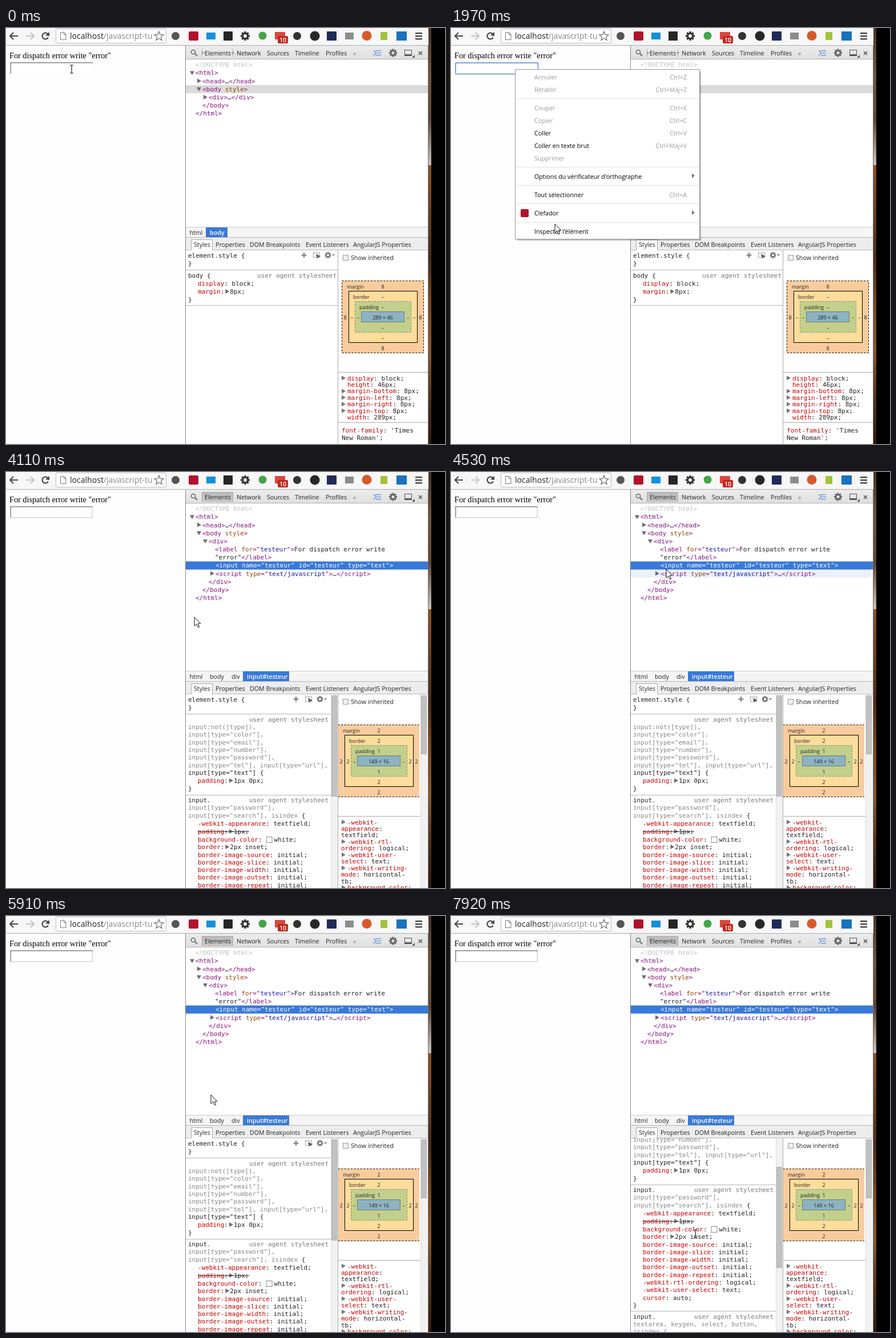
Animation of 769 by 728 pixels, one loop 8 s. Source, as an HTML page with a canvas:

```html
<!DOCTYPE html>
<html lang="fr">
<head>
<meta charset="utf-8">
<title>Inspecter l'élément</title>
<style>
html, body { margin: 0; width: 100%; height: 100%; overflow: hidden; background: #000 }
canvas { display: block }
</style>
</head>
<body>
<canvas id="stage" width="769" height="728"></canvas>
<script>
const g = document.getElementById('stage').getContext('2d');
const SANS = '10.7px "Open Sans", sans-serif', BOLD = '600 ' + SANS;
const SMALL = '9px "Open Sans", sans-serif';
const MONO = '11px "DejaVu Sans Mono", monospace';
const INK = { p: '#881280', o: '#994500', b: '#1a1aa6', k: '#222', r: '#c80000', g: '#888', w: '#fff' };

// pointer: time, x, y; held until the next entry
const MOVES = [
  [0, 115, 72], [960, 114, 73], [1660, 126, 138], [1810, 160, 262], [1970, 182, 343],
  [2120, 179, 350], [2270, 177, 352], [3690, 192, 340], [3810, 232, 312], [3960, 284, 280],
  [4110, 330, 254], [4230, 362, 232], [4380, 376, 184], [4530, 377, 170], [4680, 376, 164],
  [4800, 376, 161], [5640, 372, 186], [5790, 364, 256], [5910, 359, 313], [6030, 370, 352],
  [6180, 398, 420], [6300, 430, 488], [6450, 464, 545], [6590, 481, 565], [7350, 474, 569],
  [7500, 456, 565], [7620, 438, 558], [7770, 425, 553], [7920, 428, 556]
];

function box(x, y, w, h, c) { g.fillStyle = c; g.fillRect(x, y, w, h); }
function frame(x, y, w, h, c, dash = []) {
  g.strokeStyle = c; g.lineWidth = 1; g.setLineDash(dash);
  g.strokeRect(x + .5, y + .5, w - 1, h - 1); g.setLineDash([]);
}
function round(x, y, w, h, r, c, edge) {
  g.beginPath(); g.roundRect(x, y, w, h, r); g.fillStyle = c; g.fill();
  if (edge) { g.strokeStyle = edge; g.lineWidth = 1; g.stroke(); }
}
function disc(x, y, r, c) { g.beginPath(); g.arc(x, y, r, 0, 7); g.fillStyle = c; g.fill(); }
function line(c, w, ...p) {
  g.beginPath(); g.strokeStyle = c; g.lineWidth = w;
  for (let i = 0; i < p.length; i += 2) g.lineTo(p[i], p[i + 1]);
  g.stroke();
}
function poly(c, ...p) {
  g.beginPath(); g.fillStyle = c;
  for (let i = 0; i < p.length; i += 2) g.lineTo(p[i], p[i + 1]);
  g.fill();
}
function fade(x, y, w, h, ...cs) {
  const f = g.createLinearGradient(0, y, 0, y + h);
  cs.forEach((c, i) => f.addColorStop(i / (cs.length - 1), c));
  box(x, y, w, h, f);
}
function text(s, x, y, c = '#222', font = SANS, align = 'left') {
  g.font = font; g.fillStyle = c; g.textAlign = align; g.fillText(s, x, Math.round(y + 4));
}
// each part starts with its colour key; returns the end x
function rich(x, y, ...parts) {
  for (const p of parts) {
    text(p.slice(1), x, y, INK[p[0]], MONO);
    x += g.measureText(p.slice(1)).width;
  }
  return x;
}
const right = (x, y, c = '#6e6e6e') => poly(c, x - 3, y - 4, x + 4, y, x - 3, y + 4);
const down = (x, y, c = '#6e6e6e') => poly(c, x - 4, y - 3, x + 4, y - 3, x, y + 4);
function gear(x, y, r, c, hole) {
  for (let i = 0; i < 4; i++) {
    const a = i * Math.PI / 4, u = Math.cos(a) * r, v = Math.sin(a) * r;
    line(c, r / 2.3, x - u, y - v, x + u, y + v);
  }
  disc(x, y, r * .74, c); disc(x, y, r * .36, hole);
}

function browserBar() {
  const bg = '#f7f7f7', c = '#444';
  box(0, 0, 740, 30, bg);
  for (const [x, d, k] of [[14, -1, c], [42, 1, '#c4c4c4']]) {
    line(k, 2, x - 7 * d, 14, x + 6 * d, 14);
    line(k, 2, x + d, 8, x + 7 * d, 14, x + d, 20);
  }
  g.beginPath(); g.arc(69, 14, 5.5, .5, 5.5); g.strokeStyle = c; g.lineWidth = 2.2; g.stroke();
  poly(c, 76, 7, 76, 14, 69, 13);
  round(87.5, 1.5, 193, 25, 2, '#fff', '#b8b8b8');
  g.lineWidth = 1; g.strokeStyle = '#777';
  g.stroke(new Path2D('M95.500 7.500h6l3.500 3.500v9.500h-9.500zM101.500 7.500v4h4'));
  g.save(); g.beginPath(); g.rect(108, 3, 148, 22); g.clip();
  const url = '14.05px "Open Sans", sans-serif';
  text('localhost', 112, 14.5, '#222', url);
  text('/javascript-tutorial', 112 + g.measureText('localhost').width, 14.5, '#888', url);
  g.restore();
  g.beginPath();
  for (let i = 0; i < 10; i++) {
    const a = i * Math.PI / 5 - Math.PI / 2, r = i % 2 ? 3.6 : 8.5;
    g.lineTo(268 + r * Math.cos(a), 14.5 + r * Math.sin(a));
  }
  g.closePath(); g.strokeStyle = '#666'; g.lineWidth = 1.2; g.stroke();

  disc(297, 14, 7, '#555');
  round(320, 6, 17, 16, 2, '#b3122c');
  box(351, 8, 16, 12, '#1390dc');
  box(381, 6, 16, 16, '#262626');
  gear(419, 14, 8, '#333', bg);
  disc(449.5, 13.5, 7, '#43a547');
  box(471, 7, 18, 13, '#d8493d');
  round(476, 14, 18, 13, 2, '#c0271f');
  text('10', 485, 20.5, '#fff', BOLD, 'center');
  disc(510, 14, 7, '#333');
  disc(541, 14, 8.5, '#272727');
  box(562, 6, 17, 16, '#1f2b58');
  box(594, 8, 15, 12, '#8c8c8c');
  disc(632, 13.5, 8.5, '#d9582b');
  box(656, 7, 12, 14, '#a0c33a');
  box(684, 6, 18, 16, '#1773bd');
  for (const y of [8, 13, 18]) box(717, y, 12, 2.4, '#444');
  box(0, 30, 740, 1, '#aaa');
}

function page(t) {
  box(0, 31, 314, 697, '#fdfdfd');
  text('For dispatch error write "error"', 6, 49, '#000', '14.26px "Liberation Serif", serif');
  box(8, 61, 144, 19, '#fff');
  if (t >= 1080 && t < 3420) {
    round(8, 61, 144.5, 19.5, 1, '#fff');
    g.strokeStyle = '#7ba5e6'; g.lineWidth = 2; g.stroke();
    if (t < 1510 || t >= 2120 && t < 2580 || t >= 3140) box(9, 63, 1, 15, '#000');
  } else {
    if (t >= 3420) { box(7, 79, 145, 1.5, '#d4d4d4'); box(150.5, 60, 1.5, 20, '#d4d4d4'); }
    box(7, 60, 145, 1.5, '#858585'); box(7.5, 60, 1.5, 20, '#858585');
  }
}

function highlight(x, y, w, h, tag, id, W, H) {
  box(x, y, w, h, 'rgba(111,168,220,.66)');
  const ty = y + h + 3.5, n = (tag + id + W + H).length + 7;
  g.beginPath();
  [[x + .5, ty], [x + 13, ty], [x + 21, ty - 6], [x + 29, ty], [x + n * 6.62 + 7, ty],
   [x + n * 6.62 + 7, ty + 17], [x + .5, ty + 17]].forEach(p => g.lineTo(...p));
  g.closePath(); g.fillStyle = '#ffffc2'; g.fill();
  g.strokeStyle = '#888'; g.lineWidth = 1; g.stroke();
  rich(x + 4, ty + 8.5, 'p' + tag, 'b' + id, 'k ' + W, 'gpx × ', 'k' + H, 'gpx');
}

function toolbar(picked) {
  fade(315, 31, 424, 23, '#ececec', '#e0e0e0'); box(315, 54, 424, 1, '#b0b0b0');
  g.strokeStyle = '#666'; g.lineWidth = 1.5;
  g.beginPath(); g.arc(328, 42, 3.6, 0, 7); g.stroke(); line('#666', 2, 331, 45, 335, 49);
  if (picked) { fade(343, 35, 55, 17, '#b9b9b9', '#cbcbcb'); frame(343, 35, 55, 17, '#aaa'); }
  else for (const x of [343, 397]) {
    fade(x, 35, 1, 17, '#e4e4e4', '#777', '#e4e4e4'); box(x - 2 + (x < 350) * 2, 43, 5, 1, '#777');
  }
  const tabs = { Elements: 348, Network: 404, Sources: 457, Timeline: 506, Profiles: 560, '»': 608 };
  for (const s in tabs) text(s, tabs[s], 43.5, s == '»' ? '#777' : '#222');
  line('#5a8fe0', 1.4, 644, 39, 649, 43.5, 644, 48);
  for (const y of [39, 43, 47]) box(y == 43 ? 651 : 648, y, y == 43 ? 6 : 9, 1.3, '#5a8fe0');
  gear(678, 43.5, 7, '#666', '#e5e5e5');
  frame(698, 38, 13, 11, '#555'); box(698, 46, 13, 3, '#555'); poly('#555', 716, 47, 716, 52, 711, 52);
  line('#555', 1.6, 723, 41, 729, 47); line('#555', 1.6, 729, 41, 723, 47);
}

function tree(picked, hover) {
  box(315, 55, 424, 293, '#fff');
  const pitch = 14.15, row = i => 64.3 + i * pitch, top = i => row(i) - 6.8;
  text('<!DOCTYPE html>', 332, row(0), '#c0c0c0', MONO);
  down(326, row(1)); rich(332, row(1), 'p<html>');
  right(338, row(2)); rich(344, row(2), 'p<head>', 'k…', 'p</head>');
  if (!picked) box(315, top(3), 424, pitch, '#dadada');
  down(338, row(3)); rich(344, row(3), 'p<body', 'o style', 'p>');
  if (!picked) {
    right(349, row(4)); rich(355, row(4), 'p<div>', 'k…', 'p</div>');
    rich(344, row(5), 'p</body>'); rich(332, row(6), 'p</html>');
    return;
  }
  if (hover && hover != 7) round(315, top(hover), 421, pitch, 4, '#ebf1fb');
  down(349, row(4)); rich(355, row(4), 'p<div>');
  rich(366, row(5), 'p<label', 'o for', 'p="', 'btesteur', 'p">', 'kFor dispatch error write');
  rich(366, row(6), 'k"error"', 'p</label>');
  box(315, top(7), 424, pitch, '#3879d9');
  rich(367, row(7), 'w<input name="testeur" id="testeur" type="text">');
  right(361, row(8));
  rich(367, row(8), 'p<script', 'o type', 'p="', 'btext/javascript', 'p">', 'k…', 'p<\/script>');
  rich(355, row(9), 'p</div>'); rich(344, row(10), 'p</body>'); rich(332, row(11), 'p</html>');
}

function crumbs(picked) {
  box(315, 348, 424, 19, '#f5f5f5'); box(315, 348, 424, 1, '#ccc'); box(315, 366, 424, 1, '#b5b5b5');
  if (picked) box(415, 349, 81, 17, '#3879d9'); else box(350, 349, 38, 17, '#3879d9');
  text('html', 321.5, 357.5);
  text('body', 357, 357.5, picked ? '#222' : '#fff', picked ? SANS : BOLD);
  if (picked) { text('div', 395, 357.5); text('input#testeur', 422, 357.5, '#fff', BOLD); }
  box(315, 367, 424, 22, '#ededed'); box(315, 388, 424, 1, '#bbb');
  box(324, 370, 38, 19, '#fff'); frame(324, 370, 38, 20, '#aaa'); box(325, 388, 36, 2, '#fff');
  const tabs = { Styles: 329, Properties: 367, 'DOM Breakpoints': 427, 'Event Listeners': 525, 'AngularJS Properties': 608 };
  for (const s in tabs) text(s, tabs[s], 379);
}

function prop(y, name, value, mark) {
  let x = rich(336, y, 'r' + name, 'k:');
  if (mark == 'swatch') { frame(x + 7, y - 5, 11, 11, '#888'); x += 21; }
  else if (mark) { right(x + 5, y); x += 10; }
  else x += 6.6;
  rich(x, y, 'k' + value + ';');
}

function styles(detail, scroll) {
  box(315, 389, 266, 339, '#fff');
  g.save(); g.beginPath(); g.rect(315, 389, detail ? 254 : 266, 339); g.clip(); g.translate(0, -scroll);
  const edge = detail ? 565 : 579, dx = edge - 579;
  const rule = y => box(315, y, 266, 1, '#b5b5b5');
  const agent = y => text('user agent stylesheet', edge, y, '#777', MONO, 'right');
  const list = (y, ...rows) => rows.forEach((s, i) => rich(319, y + i * 13.3, 'g' + s));
  rich(319, 397.5, 'kelement.style {'); rich(319, 412, 'k}');
  line('#777', 2, 517.5 + dx, 397.5, 526.5 + dx, 397.5); line('#777', 2, 522 + dx, 393, 522 + dx, 402);
  frame(538 + dx, 393, 12, 9, '#777', [2, 1]); poly('#555', 543 + dx, 395, 551 + dx, 400, 547 + dx, 401, 545 + dx, 404);
  gear(564 + dx, 397.5, 5.5, '#777', '#fff'); poly('#777', 571 + dx, 396, 576 + dx, 396, 573.5 + dx, 399);
  rule(423); agent(432.5);
  if (!detail) {
    rich(319, 432.5, 'kbody {');
    prop(447, 'display', 'block'); prop(461, 'margin', '8px', 'more');
    rich(319, 475, 'k}'); rule(485);
  } else {
    list(446, 'input:not([type]),', 'input[type="color"],', 'input[type="email"],', 'input[type="number"],',
      'input[type="password"],', 'input[type="tel"], input[type="url"],');
    rich(319, 525.5, 'kinput[type="text"] {');
    prop(540, 'padding', '1px 0px', 'more'); rich(319, 554, 'k}');
    rule(565); agent(573.5); rich(319, 573.5, 'kinput', 'g,');
    list(587, 'input[type="password"],'); rich(319, 600.5, 'ginput[type="search"], isindex ', 'k{');
    prop(615, '-webkit-appearance', 'textfield');
    prop(629, 'padding', '1px', 'more'); line('#333', 1, 336, 629.5, 426, 629.5);
    prop(643, 'background-color', 'white', 'swatch');
    prop(656, 'border', '2px inset', 'more');
    ['border-image-source', 'border-image-slice', 'border-image-width', 'border-image-outset', 'border-image-repeat']
      .forEach((n, i) => prop(669.5 + i * 13.3, n, 'initial'));
    prop(736, '-webkit-rtl-ordering', 'logical'); prop(749, '-webkit-user-select', 'text');
    prop(762.5, 'cursor', 'auto'); rich(319, 776, 'k}');
    rule(786); agent(796); rich(319, 796, 'kinput', 'g,');
    list(809, 'textarea, keygen, select, button,', 'isindex {');
  }
  g.restore();
  if (detail) scrollbar(569, 391 + scroll / 95 * 48, 177);
  box(581, 389, 1, 339, '#aaa');
}

function scrollbar(x, y, h) {
  box(x, 389, 12, 339, '#f1f1f1'); box(x, 389, 1, 339, '#ddd');
  box(x + 1, y, 10, h, '#c1c1c1'); frame(x + 1, y, 10, h, '#b2b2b2');
}

function metrics(detail) {
  box(582, 389, 157, 339, '#fff');
  frame(590, 397, 10, 10, '#999'); box(591, 398, 8, 8, '#eee'); text('Show inherited', 604, 402);
  g.save(); g.beginPath(); g.rect(582, 389, detail ? 142 : 157, 339); g.clip();
  g.translate(detail ? -7 : 0, 0);
  box(588, 442, 144, 127, '#f9cc9d'); frame(588, 442, 144, 127, '#000', [3, 2.6]);
  box(600, 460, 121, 91, '#fddd9b'); frame(600, 460, 121, 91, '#000');
  box(611, 478, 99, 55, '#c3d08b'); frame(611, 478, 99, 55, '#888', [3, 2.6]);
  box(622, 496, 76, 19, '#8bb4c0'); frame(622, 496, 76, 19, '#777');
  const put = (s, x, y) => text(s, x, y - .5, '#222', SMALL, 'center');
  text('margin', 597, 451.5, '#222', SMALL); text('border', 608, 469.5, '#222', SMALL); text('padding', 619, 487.5, '#222', SMALL);
  put(detail ? '149 × 16' : '289 × 46', 660, 506);
  const m = detail ? 2 : 8, b = detail ? 2 : '–', p = detail ? 1 : '–';
  [[m, 452, 560], [b, 470, 542], [p, 488, 524]].forEach(([s, y1, y2]) => { put(s, 660, y1); put(s, 660, y2); });
  [[m, 594, 726], [b, 606, 715], ['–', 617, 704]].forEach(([s, x1, x2]) => { put(s, x1, 506); put(s, x2, 506); });
  g.restore();
  box(582, 602, 157, 1, '#aaa');
  const rows = detail
    ? ['>-webkit-', 'appearance:', ' textfield;', '>-webkit-rtl-', 'ordering: logical;', '>-webkit-user-', 'select: text;',
       '>-webkit-writing-', 'mode: horizontal-', ' tb;', '>background-color:']
    : ['>display: block;', '_height: 46px;', '>margin-bottom: 8px;', '>margin-left: 8px;', '>margin-right: 8px;',
       '>margin-top: 8px;', '_width: 289px;'];
  rows.forEach((s, i) => {
    const y = 612.5 + i * 11.45;
    if (s[0] == '>') right(591, y, '#777');
    if (s[0] == ' ') return rich(587, y, 'k' + s.slice(1));
    const deep = '>_'.includes(s[0]), [n, v] = s.slice(deep ? 1 : 0).split(':');
    const x = rich(deep ? 598 : 587, y, 'r' + n);
    if (v !== undefined) rich(x, y, 'k:' + v);
  });
  if (detail) scrollbar(726, 391, 103);
  else {
    box(582, 690, 157, 1, '#aaa');
    rich(588, 703.5, 'rfont-family', "k: 'Times"); rich(588, 716.5, "kNew Roman';");
  }
}

function menu(my) {
  box(116, 76, 322, 296, 'rgba(0,0,0,.25)');
  box(112, 72, 324, 298, '#fff'); frame(112, 72, 324, 298, '#999');
  const rows = [
    [86, 'Annuler', 'Ctrl+Z'], [108, 'Rétablir', 'Ctrl+Maj+Z'], [140, 'Couper', 'Ctrl+X'], [162, 'Copier', 'Ctrl+C'],
    [184, 'Coller', 'Ctrl+V', 1], [205.5, 'Coller en texte brut', 'Ctrl+Maj+V', 1], [227.5, 'Supprimer', ''],
    [259.5, "Options du vérificateur d'orthographe", '>', 1], [292, 'Tout sélectionner', 'Ctrl+A', 1],
    [324, 'Clefador', '>', 1], [356, "Inspecter l'élément", '', 1]
  ];
  for (const [y, s, key, on] of rows) {
    if (on && Math.abs(my - y) < 11) box(114, y - 11, 320, 22, '#e6eefb');
    text(s, 146, y, on ? '#000' : '#999');
    if (key == '>') poly('#777', 422, y - 5, 427, y - 1, 422, y + 3);
    else text(key, 413, y, '#999', SANS, 'right');
  }
  for (const y of [123, 243, 275, 307, 340]) box(113, y, 322, 1, '#e2e2e2');
  round(122, 317, 14, 14, 2, '#b3122c');
}

function pointer(x, y, beam) {
  g.save(); g.translate(x, y);
  if (beam) {
    g.strokeStyle = '#222'; g.lineWidth = 1.2;
    g.stroke(new Path2D('M-3-7h2.500l.500 1 .500-1h2.500M-3 7h2.500l.500-1 .500 1h2.500M0-6V6'));
  } else {
    const p = new Path2D('M0 0V15.500L3.700 12 6.300 18 8.700 17 6.200 11.200H10.800z');
    g.fillStyle = '#fff'; g.fill(p); g.strokeStyle = '#111'; g.lineWidth = 1; g.stroke(p);
  }
  g.restore();
}

function desktop() {
  box(0, 0, 769, 728, '#000');
  fade(740, 0, 5, 240, '#4a3526', '#6e5540', '#5d4635', '#c9c3b8');
  fade(740, 240, 5, 488, '#8a5228', '#6d3f20', '#4a2c18', '#7a4824', '#8a5730', '#54331c', '#30190d');
  box(739, 0, 1, 728, '#777');
}

function draw(t) {
  const [, x, y] = MOVES.findLast(m => m[0] <= t);
  const picked = t >= 3420, detail = t >= 3540;
  const hover = picked && x > 314 && y > 57 && y < 226 ? Math.round((y + .5 - 64.3) / 14.15) : 0;
  desktop();
  browserBar();
  page(t);
  if (picked && !detail) highlight(9, 62, 142, 16, 'div', '#inner-editor', 149, 16);
  if (hover == 7) highlight(7, 60, 146, 20, 'input', '#testeur', 153, 22);
  if (hover == 9) highlight(6, 39, 300, 43, 'div', '', 289, 46);
  box(314, 31, 1, 697, '#888');
  toolbar(picked);
  tree(picked, hover);
  crumbs(picked);
  styles(detail, t < 6740 ? 0 : t < 6890 ? 47.5 : 95);
  metrics(detail);
  if (t >= 1510 && !picked) menu(y);
  pointer(x, y, t < 1510 || t >= 6590);
}

function tick(now) { draw(now % 8000); requestAnimationFrame(tick); }
requestAnimationFrame(tick);
</script>
</body>
</html>
```
